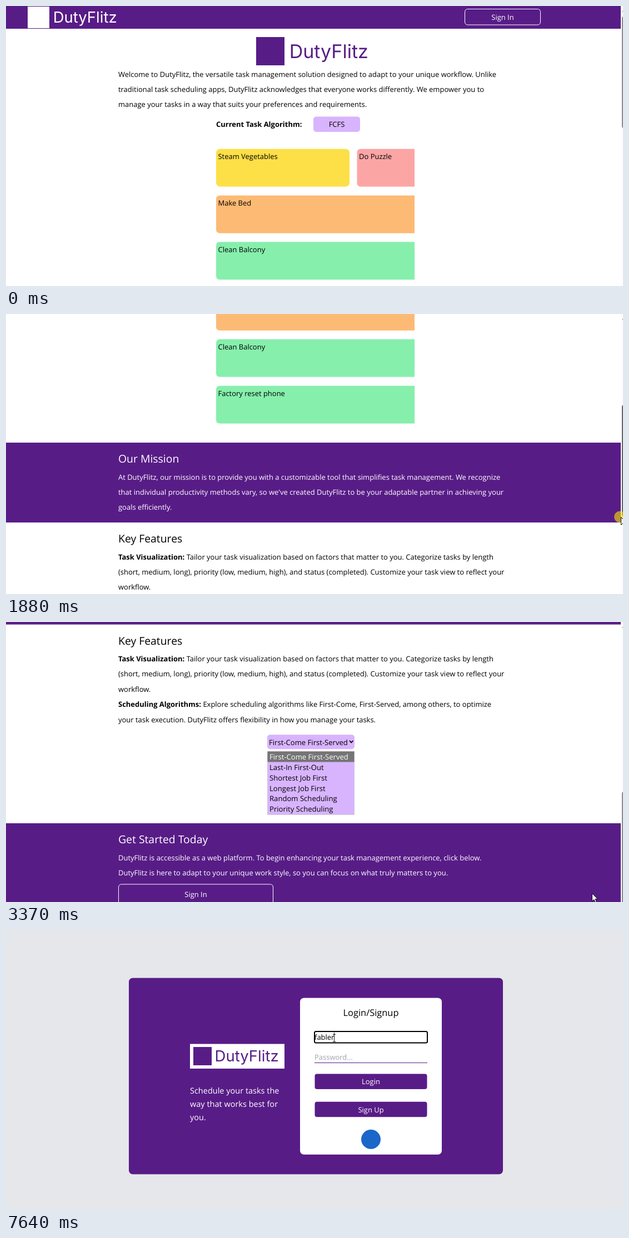
Write an HTML page that moves like this. It is 1110x505 px and loops after 8000 ms.

```html
<!DOCTYPE html>
<html lang="en">
<head>
<meta charset="utf-8">
<title>DutyFlitz</title>
<style>
  html, body { margin: 0; width: 100%; height: 100%; overflow: hidden; background: #fff; }
  svg { display: block; width: 1110px; height: 505px; }
  text { font: 12.97px "Open Sans", "Noto Sans", sans-serif; text-rendering: geometricPrecision; white-space: pre; }
  .h { font-size: 19.4px; }
  .b { font-weight: 700; }
  .o { font-size: 13.1px; }
  .title { font-size: 16.4px; }
  .tag { font-size: 14.5px; }
  .w { fill: #fff; }
  .hint { fill: #9ca3af; }
  .mid { text-anchor: middle; }
  .brand { font-family: Inter, sans-serif; }
</style>
</head>
<body>
<svg id="stage" viewBox="0 0 1110 505"></svg>
<script>
const LOOP = 8000;
const PURPLE = '#581c87', LILAC = '#d8b4fe', LINE = 27.4;
const stage = document.getElementById('stage');

const text = (x, y, s, cls = '', more = '') => `<text x="${x}" y="${y}" class="${cls}" ${more}>${s}</text>`;
const rect = (x, y, w, h, fill, r = 0, more = '') =>
  `<rect x="${x}" y="${y}" width="${w}" height="${h}" fill="${fill}" rx="${r}" ${more}/>`;
const lines = (x, y, step, cls, ...rows) => rows.map((s, i) => text(x, y + i * step, s, cls)).join('');
const bold = s => `<tspan class="b">${s}</tspan>`;
const outline = 'stroke="#fff"';

// Plain square followed by the product name
const brand = (x, y, size, fontSize, fill) =>
  rect(x, y, size, size, fill) +
  text(x + size * 1.17, y + size / 2 + fontSize * .36, 'DutyFlitz', 'brand',
    `fill="${fill}" style="font-size:${fontSize}px"`);

// Task card whose right side is cut off
const cutCard = (x, y, fill, label) =>
  `<path d="M735 ${y}H${x + 7}q-7 0-7 7v54q0 7 7 7H735z" fill="${fill}"/>` + text(x + 3.5, y + 18.5, label);

const options = ['First-Come First-Served', 'Last-In First-Out', 'Shortest Job First',
  'Longest Job First', 'Random Scheduling', 'Priority Scheduling'];

const home = [
  rect(0, 0, 1106, 41, PURPLE),
  brand(39, 1, 39, 27.5, '#fff'),
  rect(825.5, 5.5, 136, 28.5, 'none', 5, outline),
  text(893.5, 24.5, 'Sign In', 'w mid'),
  brand(450, 56, 51, 34, PURPLE),
  lines(202, 127.5, LINE, '',
    'Welcome to DutyFlitz, the versatile task management solution designed to adapt to your unique workflow. Unlike',
    'traditional task scheduling apps, DutyFlitz acknowledges that everyone works differently. We empower you to',
    'manage your tasks in a way that suits your preferences and requirements.'),
  text(378, 218, 'Current Task Algorithm:', 'b'),
  rect(553, 199.5, 84, 27.5, LILAC, 5),
  text(595, 218, 'FCFS', 'mid'),
  rect(378, 257.8, 240, 68, '#fde047', 7),
  text(381.5, 276.3, 'Steam Vegetables'),
  cutCard(631.5, 257.8, '#fca5a5', 'Do Puzzle'),
  cutCard(378, 341.7, '#fdba74', 'Make Bed'),
  cutCard(378, 425.6, '#86efac', 'Clean Balcony'),
  cutCard(378, 509.5, '#86efac', 'Factory reset phone'),

  rect(0, 612, 1106, 144, PURPLE),
  text(202, 648, 'Our Mission', 'h w'),
  lines(202, 678.5, LINE, 'w',
    'At DutyFlitz, our mission is to provide you with a customizable tool that simplifies task management. We recognize',
    "that individual productivity methods vary, so we've created DutyFlitz to be your adaptable partner in achieving your",
    'goals efficiently.'),

  text(202, 792, 'Key Features', 'h'),
  lines(202, 822.5, LINE, '',
    bold('Task Visualization:') + ' Tailor your task visualization based on factors that matter to you. Categorize tasks by length',
    '(short, medium, long), priority (low, medium, high), and status (completed). Customize your task view to reflect your',
    'workflow.',
    bold('Scheduling Algorithms:') + ' Explore scheduling algorithms like First-Come, First-Served, among others, to optimize',
    'your task execution. DutyFlitz offers flexibility in how you manage your tasks.'),
  rect(470, 954.7, 157, 26, LILAC, 5),
  text(473, 973, options[0], 'o'),
  '<path d="M618 965.5l3.2 3.4 3.2-3.4" fill="none" stroke="#000" stroke-width="1.8"/>',
  rect(470.5, 985, 156, 114, LILAC, 0, 'stroke="#cfc6d8"'),
  rect(470.5, 985, 156, 19, '#757575'),
  options.map((s, i) => text(474, 999.5 + i * 18.85, s, i ? 'o' : 'o w')).join(''),

  rect(0, 1114.5, 1106, 160, PURPLE),
  text(202, 1150.5, 'Get Started Today', 'h w'),
  lines(202, 1181, LINE, 'w',
    'DutyFlitz is accessible as a web platform. To begin enhancing your task management experience, click below.',
    'DutyFlitz is here to adapt to your unique work style, so you can focus on what truly matters to you.'),
  rect(202.5, 1224.5, 278, 37, PURPLE, 5, outline + ' id="start"'),
  text(341.5, 1247, 'Sign In', 'w mid')
].join('');

const login = [
  rect(0, 0, 1110, 505, '#e5e7eb'),
  rect(221, 86.5, 673, 354, PURPLE, 7),
  rect(331, 205.5, 170, 44.5, '#fff'),
  brand(337, 211, 33, 27.5, PURPLE),
  lines(331, 295, 24, 'tag w', 'Schedule your tasks the', 'way that works best for', 'you.'),
  rect(529, 122.5, 255, 282.5, '#fff', 7),
  text(656.5, 154.5, 'Login/Signup', 'title mid'),
  rect(555, 203, 203, 1, PURPLE),
  rect(555, 183, 203, 20.5, '#fff', 2.5, 'id="focus" stroke="#000" stroke-width="2"'),
  text(555, 197.5, 'Email...', 'hint', 'id="hint"'),
  text(555, 197.5, '', '', 'id="typed"'),
  rect(0, 185, 1, 16, '#000', 0, 'id="caret"'),
  text(555, 233.5, 'Password...', 'hint'),
  rect(555, 239, 203, 1, PURPLE),
  rect(555.5, 259.5, 202, 27.5, PURPLE, 4),
  text(656.5, 278, 'Login', 'w mid'),
  rect(555.5, 309.7, 202, 27.5, PURPLE, 4),
  text(656.5, 328.5, 'Sign Up', 'w mid'),
  '<circle cx="656.5" cy="377.5" r="17.5" fill="#1b66c9"/>'
].join('');

stage.innerHTML = `
  ${rect(0, 0, 1110, 505, '#fff')}
  <g id="home">
    <g id="page">${home}</g>
    ${rect(1106, 0, 4, 505, '#fcfcfc')}
    <path d="M1110 8l-1.5 2.5h1.5z" fill="#777"/>
    ${rect(1108, 19, 8, 201, '#8b8b8b', 3, 'id="thumb"')}
  </g>
  <g id="login">${login}</g>
  <circle id="halo" r="10.5" fill="#ffe600" fill-opacity=".6"/>
  <path id="arrow" d="M.5.5v14l3.3-3 2.3 5 2.2-1-2.3-4.8h4.3z" fill="#fff" stroke="#111"/>
  <path id="beam" d="M-2.5-6.5h2l.5.5.5-.5h2M0-6v12M-2.5 6.5h2l.5-.5.5.5h2" fill="none" stroke="#222"/>`;

const el = id => document.getElementById(id);
const [homeView, page, thumb, loginView, halo, arrow, beam, start, focusBox, hint, typed, caret] =
  ['home', 'page', 'thumb', 'login', 'halo', 'arrow', 'beam', 'start', 'focus', 'hint', 'typed', 'caret'].map(el);

// [time, scroll]
const scrolls = [[0, 0], [1270, 30], [1370, 98], [1460, 170], [1540, 222], [1610, 258],
  [1800, 322], [1880, 380], [1950, 420], [2140, 488], [2210, 539.5], [2280, 580], [2360, 616],
  [2440, 648], [2520, 675], [2600, 698], [2690, 717], [2770, 732], [2850, 744], [2940, 751.5]];

// [time, x, y]; a row without a position hides the pointer
const pointer = [[0], [3010, 1099, 491], [3090, 1091, 496], [3170],
  [3370, 1054, 489], [3420, 965, 468], [3500, 820, 451], [3590, 665, 460], [3680, 511, 484], [3770],
  [4890, 411, 486], [4960, 434, 388], [5030, 453, 305],
  [5220, 462, 298], [5290, 482, 284], [5360, 510, 266], [5430, 540, 249],
  [5500, 566, 235], [5570, 588, 222], [5640, 602, 212], [5710, 608, 207],
  [5970, 601, 201], [6040, 594, 197], [6120, 590.5, 195]];

const word = 'fabler';
const keyTimes = [6710, 6840, 7040, 7240, 7440, 7640];

const at = (table, t) => table.filter(row => row[0] <= t).pop();
const show = (node, on) => node.setAttribute('visibility', on ? 'visible' : 'hidden');
const move = (node, x, y) => node.setAttribute('transform', `translate(${x} ${y})`);

function draw(t) {
  const scroll = at(scrolls, t)[1];
  const onLogin = t >= 4360, dragging = t >= 1130 && t < 3010, focused = t >= 6310;

  homeView.style.display = onLogin ? 'none' : '';
  loginView.style.display = onLogin ? '' : 'none';
  move(page, 0, -scroll);
  move(thumb, 0, scroll * .382);
  thumb.setAttribute('fill', t >= 520 && t < 3170 ? '#636363' : '#8b8b8b');
  start.setAttribute('fill', t >= 4100 ? '#6b21a8' : t >= 4030 ? '#621e97' : PURPLE);

  let [, x, y] = at(pointer, t);
  if (dragging) {
    x = 1108.5 - scroll * .0065;
    y = 202 + scroll * .384 + (t >= 1800 && t < 2140 ? 18 : 0);
    move(halo, x - 1.5, y);
  }
  const visible = x !== undefined, typing = t >= 6040;
  show(halo, dragging);
  show(arrow, visible && !typing);
  show(beam, visible && typing);
  if (visible) move(typing ? beam : arrow, x, y);

  const count = keyTimes.filter(k => k <= t).length;
  typed.textContent = word.slice(0, count);
  show(focusBox, focused);
  show(hint, !count);
  show(caret, focused);
  if (onLogin) caret.setAttribute('x', 554.5 + (count ? typed.getComputedTextLength() : 0));
}

const begin = performance.now();
function tick() {
  draw((performance.now() - begin) % LOOP);
  requestAnimationFrame(tick);
}
tick();
</script>
</body>
</html>
```
